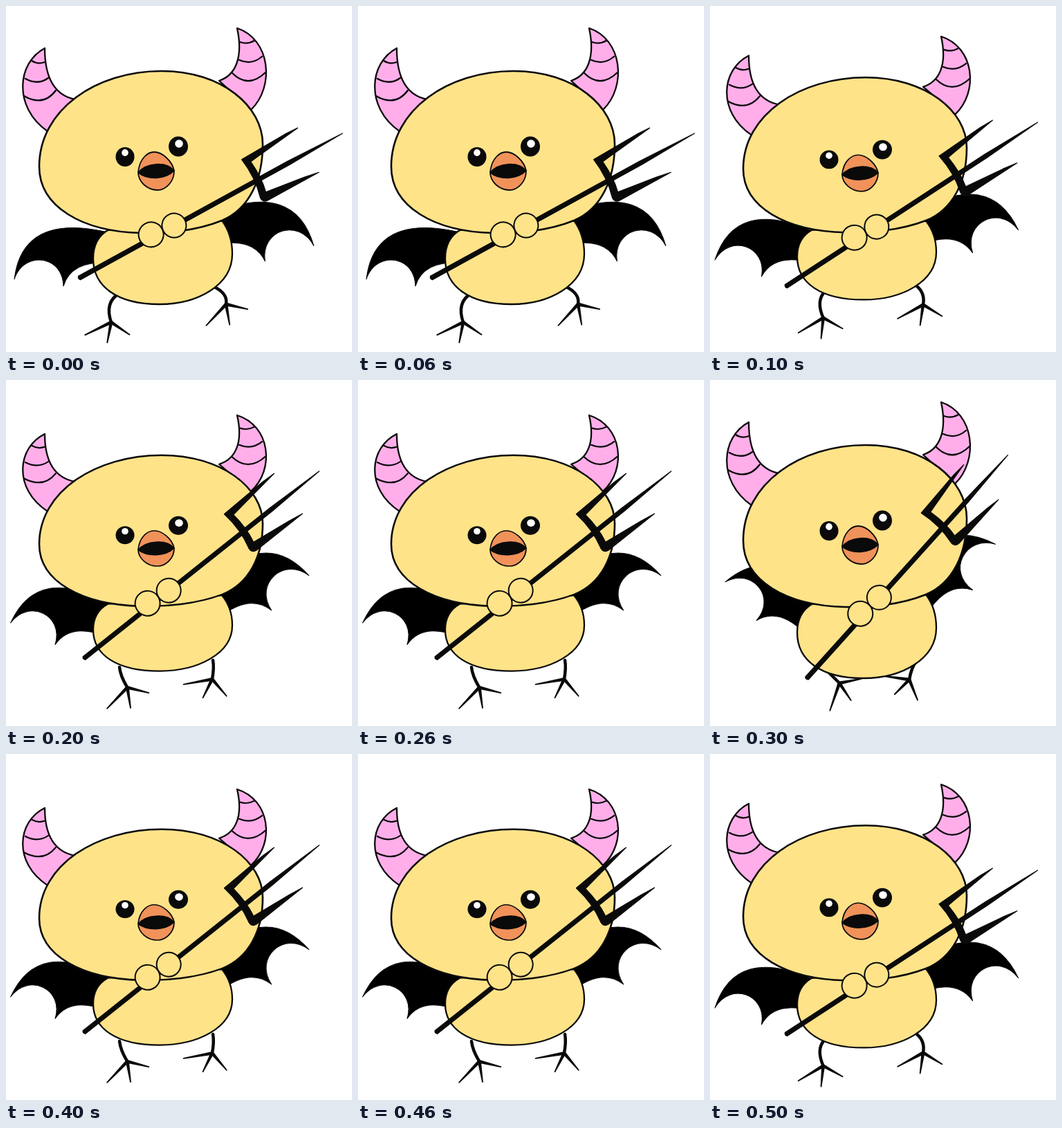
Write an HTML page with a canvas that moves like this. It is 500 px wide and 500 px high and loops after 0.6 s.

```html
<!DOCTYPE html>
<html>
<head>
<meta charset="utf-8">
<title>Little devil chick</title>
<style>
html, body { margin: 0; width: 100%; height: 100%; overflow: hidden; background: #fff; }
canvas { display: block; }
</style>
</head>
<body>
<canvas id="stage" width="500" height="500"></canvas>
<script>
const ctx = document.getElementById('stage').getContext('2d');
const INK = '#0a0a0a', YELLOW = '#ffe389', PINK = '#ffaeea', ORANGE = '#f0925a';
const STEP = 100, LAST = 3;

// wings: left and right lift in degrees; pole: butt x, y and tilt in degrees
const POSES = [
  { squash: 1, wings: [0, 9.5], pole: [106, 393, 28.8] },
  { squash: .957, wings: [11.5, 18.5], pole: [110, 405, 33.1] },
  { squash: .932, wings: [18, 35], pole: [113, 402, 38.5] },
  { squash: 1, wings: [43, 55.5], pole: [140, 431, 48] }
];

const HEAD = 'M48 232C48 150 130 94 225 94C312 94 371 145 371 200C371 250 352 293 312 310' +
             'C275 325 230 329 195 328C110 326 48 290 48 232Z';
const BODY = 'M147 324C132 333 126 348 126 365C126 405 160 431 222 431' +
             'C276 431 327 404 327 358C327 338 321 322 312 310Z';
const HORNS = 'M56 61C16 82 10 146 60 181L100 135C70 129 56 104 56 61Z' +
              'M334 32C382 48 389 116 354 150L308 108C332 100 343 74 334 32Z';
const BANDS = 'M37 79Q46 85 56 81M28 105Q46 115 61 104M26 130Q54 146 72 122' +
              'M338 52Q349 56 359 50M337 78Q355 86 370 73M327 97Q350 120 375 96';
const BEAK = 'M191 240C193 220 205 211 214 211C226 211 240 224 243 238' +
             'C243 255 230 266 219 266C204 266 191 254 191 240Z';
const MOUTH = 'M191 241C202 226 232 224 243 238C230 251 205 252 191 241Z';
const WING = 'M-5 -30Q-125 -56 -136 39C-122 -3 -66 4 -65 49Q-54 12 0 15Z';
const FORK = 'M0 -3L345 -3L434 0L345 3L0 3Q-3 0 0 -3Z' +
             'M288 -37L360 -39L381 -38L306 -29L298 -28Q301 0 296 21L355 29L377 33L292 33' +
             'Q284 32 285 24Q293 -5 288 -37Z';
const TOES = [[154, 42], [101, 30], [34, 32]]; // angle, length

const FEET = [
  { hip: [164, 415], knee: [-10, 428], from: [152, 457], to: [187, 438], turn: [0, -45], ease: 2 },
  { hip: [299, 405], knee: [3, 415], from: [318, 431], to: [288, 433], turn: [-21, 34], ease: 1 }
];

const lerp = (a, b, t) => a + (b - a) * t;
const rad = deg => deg * Math.PI / 180;

function shape(path, fill, width = 2.3) {
  const p = new Path2D(path);
  if (fill) {
    ctx.fillStyle = fill;
    ctx.fill(p);
  }
  ctx.lineWidth = width;
  ctx.stroke(p);
}

function oval(x, y, rx, ry, fill, width) {
  ctx.beginPath();
  ctx.ellipse(x, y, rx, ry, 0, 0, Math.PI * 2);
  ctx.fillStyle = fill;
  ctx.fill();
  if (width) {
    ctx.lineWidth = width;
    ctx.stroke();
  }
}

function place(x, y, angle, sx, sy, draw) {
  ctx.save();
  ctx.translate(x, y);
  ctx.scale(sx, sy);
  ctx.rotate(rad(angle));
  draw();
  ctx.restore();
}

function squash(baseY, k, draw) {
  place(0, baseY * (1 - k), 0, 1, k, draw);
}

function drawFoot({ hip, knee, from, to, turn, ease }, t) {
  const x = lerp(from[0], to[0], t), y = lerp(from[1], to[1], t);
  shape(`M${hip}Q${x + knee[0]} ${knee[1]} ${x} ${y}`, null, 4.5);
  for (const [angle, length] of TOES) {
    place(x, y, angle + lerp(...turn, t ** ease), 1, 1,
      () => shape(`M0 -1.6L${length} 0L0 1.6Z`, INK, 1.8));
  }
}

function drawWings([left, right]) {
  place(148, 356, left, 1, 1, () => shape(WING, '#000', 1));
  place(300, 330, right, -1.03, 1.03, () => shape(WING, '#000', 1));
}

function drawHead() {
  shape(HORNS, PINK);
  shape(BANDS);
  shape(HEAD, YELLOW, 2.6);
  oval(172, 218, 13.5, 14, INK);
  oval(172, 212, 4.8, 5, '#fff');
  oval(249, 203, 14, 14.5, INK);
  oval(250, 199, 5.8, 5.8, '#fff');
  shape(BEAK, ORANGE, 1.8);
  shape(MOUTH, INK, 1.5);
}

function drawPole() {
  shape(FORK, INK, 1.2);
  oval(121, -5, 18, 18, YELLOW, 2);
  oval(156.5, -.5, 17.5, 17.5, YELLOW, 2);
}

function draw(index) {
  const pose = POSES[index], [x, y, tilt] = pose.pole;
  ctx.fillStyle = '#fff';
  ctx.fillRect(0, 0, 500, 500);
  ctx.strokeStyle = INK;
  ctx.lineCap = ctx.lineJoin = 'round';
  FEET.forEach(foot => drawFoot(foot, index / LAST));
  drawWings(pose.wings);
  squash(322, lerp(1, pose.squash, 1.4), () => shape(BODY, YELLOW));
  squash(310, pose.squash, drawHead);
  place(x, y, -tilt, 1, 1, drawPole);
}

function tick() {
  const step = Math.floor(performance.now() / STEP) % (2 * LAST);
  draw(LAST - Math.abs(LAST - step)); // there and back again
  requestAnimationFrame(tick);
}
tick();
</script>
</body>
</html>
```
